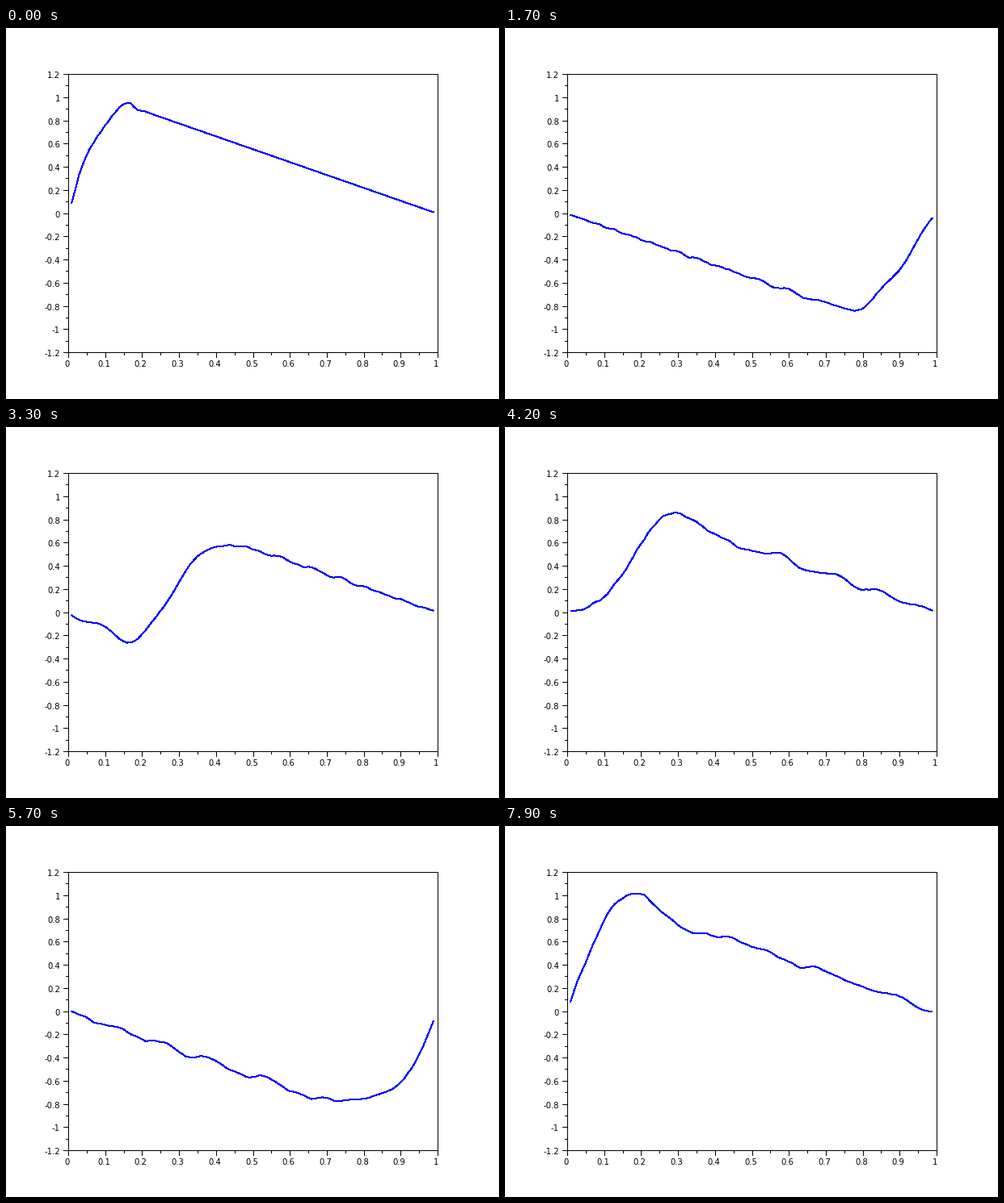
Write a matplotlib script that moves like this. It is 610 by 460 pixels and loops after 8000 ms.

```python
import numpy as np
import matplotlib.pyplot as plt
from matplotlib.animation import FuncAnimation

W, H, DPI = 610, 460, 100
LEFT, RIGHT, TOP, BOTTOM = 76, 533, 57, 402
FRAMES, INTERVAL = 80, 100
PX = 72 / DPI                       # one pixel in points

# Stiff string, plucked at PLUCK, fixed at both ends
CELLS = 100
PLUCK, STIFF = 0.1, 1e-4
START, STEP = 0.044, 0.05           # wave travel at the first frame, per frame

x = np.arange(1, CELLS) / CELLS
modes = np.arange(1, CELLS)
shapes = np.sin(np.pi * np.outer(x, modes))
pluck = np.minimum(x / PLUCK, (1 - x) / (1 - PLUCK))
amps = 2 / CELLS * shapes.T @ pluck
wave2 = (2 * CELLS * np.sin(np.pi * modes / (2 * CELLS))) ** 2
omega = np.sqrt(wave2 + STIFF * wave2 ** 2)


def string(t):
    return shapes @ (amps * np.cos(omega * t))


def to_x(v):
    return LEFT + 0.5 + (RIGHT - LEFT) * v


def to_y(v):
    return TOP + 0.5 + (BOTTOM - TOP) * (1.2 - v) / 2.4


# The small margin keeps float rounding from losing a pixel
fig = plt.figure(figsize=((W + 0.01) / DPI, (H + 0.01) / DPI), dpi=DPI,
                 facecolor="white")
ax = fig.add_axes([0, 0, 1, 1])
ax.set_xlim(0, W)
ax.set_ylim(H, 0)
ax.axis("off")


def stroke(xs, ys, color="black"):
    return ax.plot(xs, ys, color=color, lw=PX, antialiased=False,
                   solid_capstyle="butt", solid_joinstyle="miter")[0]


def label(px, py, value, align):
    ax.text(px, py, f"{value:g}", ha=align, va="center_baseline",
            family="DejaVu Sans", size=10 * PX)


l, r, t, b = LEFT + 0.5, RIGHT + 0.5, TOP + 0.5, BOTTOM + 0.5
stroke([l, r, r, l, l], [t, t, b, b, t])

for i in range(21):
    px = np.floor(to_x(i / 20)) + 0.5
    major = i % 2 == 0
    stroke([px, px], [b, b + (6 if major else 3)])
    if major:
        label(px - 1, 415.5, i / 20, "center")

for i in range(-12, 13):
    py = np.floor(to_y(i / 10)) + 0.5
    major = i % 2 == 0
    stroke([l - (6 if major else 3), l], [py, py])
    if major:
        label(67, py + 0.5, i / 10, "right")

curve = stroke(to_x(x), to_y(string(START)), "#0000ff")
curve.set_snap(False)


def update(i):
    curve.set_ydata(to_y(string(START + STEP * i)))
    return (curve,)


anim = FuncAnimation(fig, update, frames=FRAMES, interval=INTERVAL,
                     repeat=True, repeat_delay=0, blit=False)
plt.show()
```
